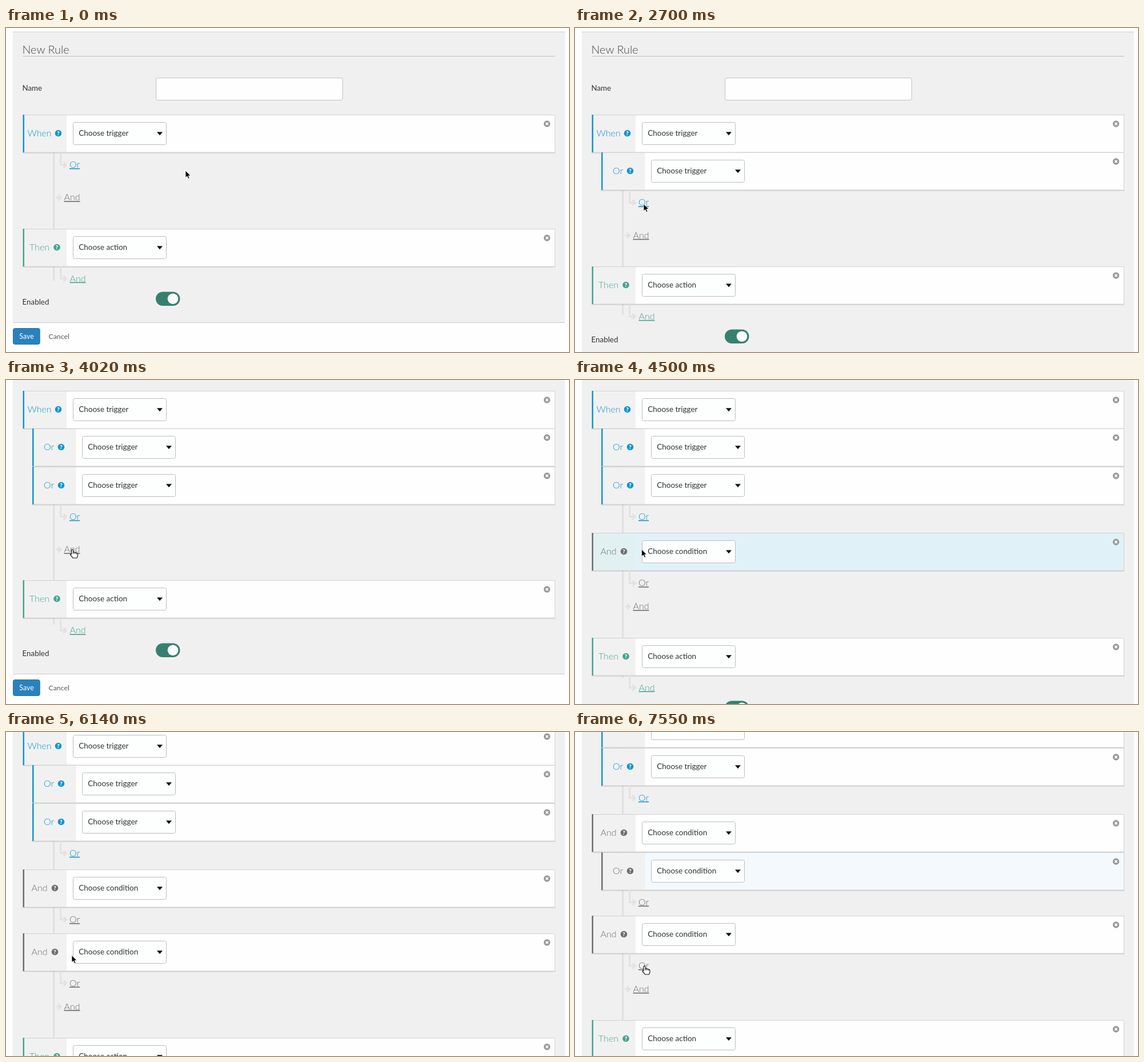
Animation of 985 by 568 pixels, one loop 7990 ms. Source, as an HTML page:

```html
<!DOCTYPE html>
<html lang="en">
<head>
<meta charset="utf-8">
<title>New Rule</title>
<style>
  html, body { margin: 0; width: 100%; height: 100%; overflow: hidden; background: #fefefe; }
  svg { display: block; width: 100%; height: 100%; font-family: Lato, 'Open Sans', sans-serif; }
  .mid { text-anchor: middle; }
  .light { font-weight: 300; }
  .link { text-decoration: underline; text-decoration-thickness: 1px; text-underline-offset: 2px; }
  .darken { mix-blend-mode: darken; }
</style>
</head>
<body>
<svg id="stage" viewBox="0 0 985 568"></svg>
<script>
const DURATION = 7990;
const TOP = 152, CARD = 66.4;   // first card and card height
const INDENT = 16.5;
const FADE = 540;               // highlight time of a new card
const BLUE = '#1194d0', GREEN = '#46a391', GRAY = '#6e6e6e', TRACK = '#e1e1e1';

// When each extra card appears
const ADDED = { or1: 1370, or2: 2850, and1: 4200, and2: 5540, andOr: 7100 };

const SCROLLS = [
  { leave: 2850, arrive: 3300, y: 134 },
  { leave: 3660, arrive: 3840, y: 133 },
  { leave: 5990, arrive: 6490, y: 257 },
];
// Pointer stops; it is a hand from arrival until handEnd
const STOPS = [
  { leave: 200, arrive: 470, x: 330, y: 258 },
  { leave: 800, arrive: 1200, x: 120, y: 237, handEnd: 1370 },
  { leave: 2150, arrive: 2400, x: 120, y: 308.5, handEnd: 2690 },
  { leave: 3660, arrive: 3840, x: 116.5, y: 297, handEnd: 4200 },
  { leave: 4500, arrive: 5150, x: 115, y: 391.5, handEnd: 5540 },
  { leave: 6140, arrive: 6810, x: 119, y: 229, handEnd: 7200 },
  { leave: 7150, arrive: 7550, x: 122, y: 410, handEnd: DURATION },
];

function travel(moves, axis, value, t) {
  for (const move of moves) {
    const p = Math.min(1, Math.max(0, (t - move.leave) / (move.arrive - move.leave)));
    value += (move[axis] - value) * p * p * (3 - 2 * p);
  }
  return value;
}

const rect = (x, y, w, h, fill, extra = '') =>
  `<rect x="${x}" y="${y}" width="${w}" height="${h}" fill="${fill}" ${extra}/>`;
const text = (x, y, size, fill, content, style = '') =>
  `<text x="${x}" y="${y}" font-size="${size}" fill="${fill}" class="${style}">${content}</text>`;
const stroke = (d, color, width) =>
  `<path d="${d}" fill="none" stroke="${color}" stroke-width="${width}"/>`;
const disc = (x, y, r, fill) => `<circle cx="${x}" cy="${y}" r="${r}" fill="${fill}"/>`;

function card(y, label, color, choice, glow = 0, indent = 0) {
  const x = 29 + indent, bodyX = 106 + indent, selectX = 117.5 + Math.floor(indent);
  const labelX = indent ? 75 : 58.5;
  const helpX = { When: 91.5, Or: 96.5, Then: 89, And: 85.5 }[label];
  const width = 932 - indent, height = 66;
  return rect(x, y + 2, width, height, '#000', 'opacity=".1"')
    + rect(x, y, width, height, '#fefefe')
    + rect(x, y, width, height, '#bce0f0', `opacity="${glow}"`)
    + rect(x, y, bodyX - x, height, '#f1f1f1', 'class="darken"')
    + stroke(`M${x} ${y + .5}H960.5V${y + height}H${x}`, '#d2d2d2', 1)
    + rect(x + .5, y, 2.5, height, color)
    + text(labelX, y + 37.5, 16, color, label, 'mid light')
    + disc(helpX, y + 32.5, 5.8, color)
    + text(helpX, y + 36, 9.5, '#fff', '<tspan font-weight="900">?</tspan>', 'mid')
    + rect(selectX, y + 13.5, 163, 39, '#fdfefe', 'rx="3" stroke="#bdbdbd"')
    + text(selectX + 9.7, y + 37.3, 13.5, '#333', 'Choose ' + choice)
    + `<path d="M${selectX + 146.5} ${y + 30.2}h10l-5 6z" fill="#111"/>`
    + disc(946.5, y + 16, 5.7, '#999')
    + stroke(`M944.4 ${y + 13.9}l4.2 4.2m0-4.2l-4.2 4.2`, '#fff', 1.6);
}

const link = (x, y, label, color) => text(x, y + 5, 16, color, label, 'mid light link');

// Elbow arrow below a card, leading to a link
const branch = (y, label, color) =>
  stroke(`M95.7 ${y}V${y + 21.5}H104M100.5 ${y + 16.5}l5 5l-5 5`, TRACK, 2.7)
  + link(label === 'Or' ? 120 : 125.5, y + 21.5, label, color);

function page(t) {
  const has = name => t >= ADDED[name];
  const glow = name => Math.max(0, 1 - (t - ADDED[name]) / FADE);
  let y = TOP, cards = '';
  const add = (...args) => { cards += card(Math.round(y), ...args); y += CARD; };

  add('When', BLUE, 'trigger');
  for (const name of ['or1', 'or2'].filter(has)) add('Or', BLUE, 'trigger', glow(name), INDENT);
  cards += branch(y, 'Or', BLUE);

  let gap = 50;
  for (const name of ['and1', 'and2'].filter(has)) {
    y += gap;
    add('And', GRAY, 'condition', glow(name));
    if (name === 'and1' && has('andOr')) add('Or', GRAY, 'condition', glow('andOr'), INDENT);
    cards += branch(y, 'Or', GRAY);
    gap = 45;
  }

  const andY = y + (has('and1') ? 62.5 : 79);
  cards += stroke(`M87 ${andY}H95M91 ${andY - 5}l5 5l-5 5`, TRACK, 2.7) + link(115.5, andY, 'And', GRAY);

  y += has('and1') ? 117 : 133.2;
  const thenY = Math.round(y);
  add('Then', GREEN, 'action');
  cards += branch(y, 'And', GREEN);

  const extraCards = Object.keys(ADDED).filter(has).length;
  const trackEnd = y + Math.max(0, 25 - 7 * extraCards);
  const bottom = thenY + 164.5;
  return rect(12, 7, 966, bottom - 7, '#f0f0f0')
    + stroke(`M12 7H978M12 ${bottom}H978`, '#cacaca', 1.2)
    + text(28.5, 44.5, 19.8, '#444', 'New Rule', 'light')
    + stroke('M29 49.5H961', '#c0c0c0', 1)
    + text(28.5, 110, 13.3, '#333', 'Name')
    + rect(262.5, 87.5, 326.5, 39, '#fefefe', 'rx="3" stroke="#c0c0c0"')
    + rect(82, TOP, 3.2, trackEnd - TOP, TRACK)
    + cards
    + text(28.5, thenY + 133, 13.4, '#333', 'Enabled')
    + rect(262, thenY + 110.5, 42.5, 24.5, '#37806f', 'rx="12.25"')
    + disc(292, thenY + 122.7, 9.3, '#fefefe')
    + rect(12.5, thenY + 174.5, 46.7, 28, '#2b81bb', 'rx="3" stroke="#2674aa"')
    + text(36, thenY + 193, 12.4, '#fff', 'Save', 'mid')
    + text(74.5, thenY + 193, 12.3, '#555', 'Cancel');
}

const ARROW = 'M0 0V12.3L2.9 9.7L5 14.2L7 13.3L5.1 9H9Z';
const HAND = 'M-2 1.2Q-.5-1 1 1.2V5Q3 4 4 5.5Q6 4.8 6.8 6.3Q9 6 9 8V11Q8.5 13 7.5 15H.5Q-1 12.5-4 9.5Q-4.5 7.5-2 8.5Z'
  + 'M1 5V8M4 5.5V8M6.8 6.3V8.5';

function pointer(t) {
  const isHand = STOPS.some(stop => t >= stop.arrive && t < stop.handEnd);
  const look = isHand
    ? `d="${HAND}" fill="#fff" stroke="#111" stroke-width="1.1"`
    : `d="${ARROW}" fill="#000" stroke="#fff" stroke-width=".8"`;
  const x = travel(STOPS, 'x', 314, t), y = travel(STOPS, 'y', 250, t);
  return `<path transform="translate(${x} ${y})" ${look}/>`;
}

const stage = document.getElementById('stage');
const start = performance.now();

function loop() {
  const t = (performance.now() - start) % DURATION;
  const scroll = Math.round(travel(SCROLLS, 'y', 0, t));
  stage.innerHTML = `<g transform="translate(0 ${-scroll})">${page(t)}</g>` + pointer(t);
  requestAnimationFrame(loop);
}
loop();
</script>
</body>
</html>
```
